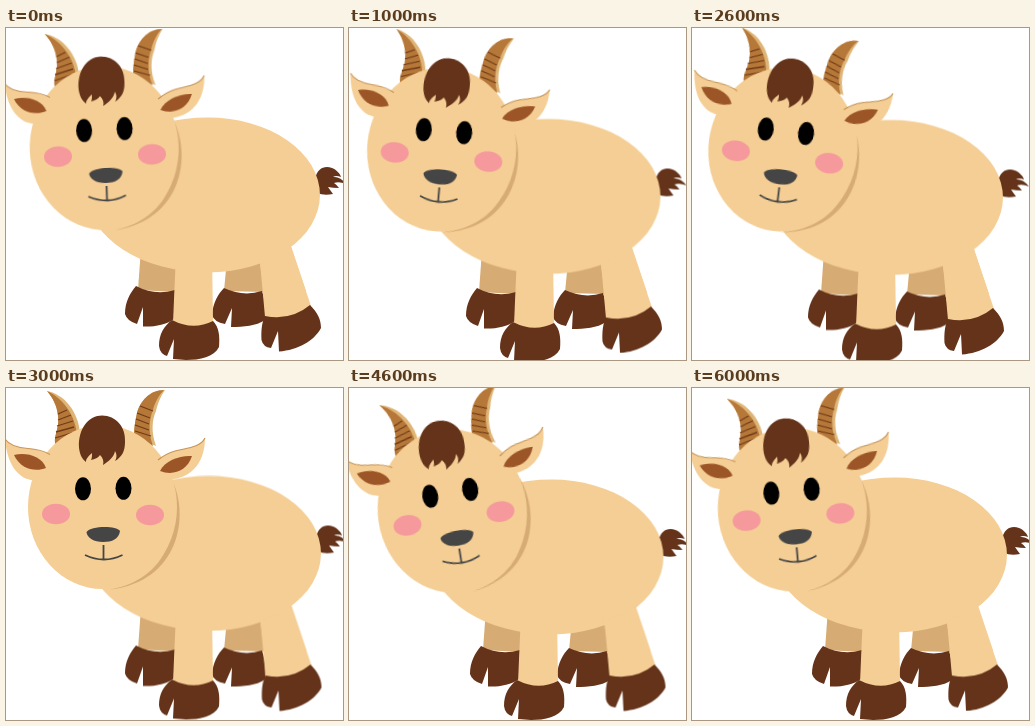
Animation of 337 by 332 pixels, one loop 7 s. Source, as an HTML page:

```html
<!DOCTYPE html>
<html lang="en">
<head>
<meta charset="utf-8">
<title>Goat</title>
<style>
  html, body { margin: 0; width: 100%; height: 100%; overflow: hidden; background: #fff; }
  svg { display: block; width: 100vw; height: 100vh; }

  .skin { fill: #f4ce94; }
  .shade { fill: #d6ac74; }
  .hoof { fill: #64331a; }
  .inner { fill: #9c5527; }
  .horn { fill: #b67839; }
  .rim { fill: #dfb577; }
  .edge { fill: none; stroke: #c79558; stroke-width: 1.2; }
  .rings { fill: none; stroke: #6f3b17; stroke-width: 1.3; }
  .cheek { fill: #f5999c; }
  .nose { fill: #454545; }
  .mouth { fill: none; stroke: #454545; stroke-width: 1.8; }

  /* every pose is held for one second */
  .body, .front, .rear, .head { animation: 7s step-end infinite; }
  .body { animation-name: body; }
  .front { animation-name: front; }
  .rear { animation-name: rear; }
  .head { animation-name: head; transform-origin: 97px 126.5px; }

  @keyframes body {
    0% { transform: translate(0, 0); }
    14.2857% { transform: translate(-2.5px, 1.5px); }
    28.5714% { transform: translate(-3px, 2.5px); }
    42.8571% { transform: translate(1px, -1.5px); }
    57.1428% { transform: translate(.5px, 2px); }
    71.4285% { transform: translate(1px, 3.5px); }
    85.7142% { transform: translate(1px, 0); }
  }
  @keyframes front {
    0% { transform: translate(0, 0); }
    14.2857% { transform: translate(-2px, 2px); }
    28.5714% { transform: translate(-3px, 3.5px); }
    42.8571% { transform: translate(0, -.5px); }
    57.1428% { transform: translate(2px, 0); }
    71.4285% { transform: translate(3.5px, .5px); }
    85.7142% { transform: translate(1px, 0); }
  }
  @keyframes rear {
    0% { transform: translate(0, 0); }
    14.2857% { transform: translate(-2px, 1.5px); }
    28.5714% { transform: translate(-3px, 3px); }
    42.8571% { transform: translate(.5px, -.5px); }
    57.1428% { transform: translate(1.5px, -.5px); }
    71.4285% { transform: translate(1.5px, 0); }
    85.7142% { transform: translate(1px, -.5px); }
  }
  @keyframes head {
    0% { transform: translate(2px, 1px) rotate(-2deg); }
    14.2857% { transform: translate(-4.5px, 2.5px) rotate(5deg); }
    28.5714% { transform: translate(-6.5px, 2.5px) rotate(7deg); }
    42.8571% { transform: translate(0, 0) rotate(0deg); }
    57.1428% { transform: translate(8px, 4px) rotate(-9deg); }
    71.4285% { transform: translate(11.5px, 5.5px) rotate(-12deg); }
    85.7142% { transform: translate(4.5px, 2.5px) rotate(-5deg); }
  }
</style>
</head>
<body>
<svg viewBox="0 0 337 332" preserveAspectRatio="none">
  <!-- far legs -->
  <g class="front">
    <path class="shade" d="M135 220L132 262L169 264L172 220Z"/>
    <path class="hoof" d="M130 258Q149 268 169 262L168 291C160 297 148 299 137 298.500L137 279L131 296Q121 293 119 286C119 274 124 265 130 258Z"/>
    <path class="shade" d="M222 220L218 263L259 264L262 220Z"/>
    <path class="hoof" d="M218 260Q237 269 256 263C259 272 261 284 259 292C250 298 238 299 225 299L226 280L219 296Q208 294 206 287C207 275 212 266 218 260Z"/>
  </g>

  <!-- tail and trunk -->
  <g class="body">
    <path class="hoof" d="M309 151C311 140 319 137 326 140C331 142 334 146 335 149Q330 147 327 149Q334 148 340 156Q333 153 328 155Q331 157 333 160Q327 160 322 159Q324 162 327 166Q318 168 311 165Z"/>
    <path class="skin" d="M202 89.5A112 77.5 0 0 1 202 244.5A120 77.5 0 0 1 202 89.5Z"/>
  </g>

  <!-- near legs -->
  <g class="rear">
    <path class="skin" d="M251 215L258 263Q284 270 300 263L284 215Z"/>
    <path class="hoof" d="M0 0"/>
    <path class="skin" d="M254 234L259 289Q285 293 305 278L285 219Z"/>
    <path class="hoof" d="M259 288Q285 293 304 277C311 284 315 291 315 300C308 313 292 322 273 323.500L272 303L265 320Q257 319 255.500 312C255 302 256 294 259 288Z"/>
  </g>
  <g class="front">
    <path class="skin" d="M170 225L167 295Q187 302 207 295L206 225Z"/>
    <path class="hoof" d="M166 292Q187 303 207 293C213 299 214 308 213 319C208 329 194 332 180 332L167 331L168 311L161 328Q154 326 153 318C153 306 158 298 166 292Z"/>
  </g>

  <g class="head">
    <!-- horns -->
    <path class="rim" d="M41 3C58 6 73 24 74 46L50 58C46 50 54 40 52 28C51 18 47 10 41 3Z"/>
    <path class="horn" d="M41 3C55 9 70 26 71 48L50 58C46 50 54 40 52 28C51 18 47 10 41 3Z"/>
    <path class="rings" d="M52 26L61 22M52 32L65 27M51 38L67 33M50 44L68 39M49 50L69 44"/>
    <path class="rim" d="M159 2C143 2 134 14 131 25C129 34 128 40 128 48L150 58C145 44 146 32 150 23C152 14 155 8 159 2Z"/>
    <path class="horn" d="M158 2C143 2 134 14 131 25C129 34 128 40 128 48L147 58C142 44 143 32 147 22C149 14 153 7 158 2Z"/>
    <path class="rings" d="M134 18L147 23M131 25L144 30M130 31L143 36M129 37L143 42M129 43L145 48"/>

    <!-- face -->
    <path class="shade" d="M166 92C184 128 173 194 104 201.500C170 190 176 126 160 92Z"/>
    <ellipse class="skin" cx="96.500" cy="119" rx="74.500" ry="82"/>

    <!-- ears -->
    <path class="skin" d="M-1 51C4 58 12 60 22 60.500C32 61 40 64 50 70L36 92C20 95 2 86 -1 51Z"/>
    <path class="edge" d="M-1 51C4 58 12 60 22 60.500C31 61 38 63 44 66.500"/>
    <path class="inner" d="M8 67C20 64 36 68 40 80C30 84 15 82 8 67Z"/>
    <path class="skin" d="M199 50C194 60 180 60 169 63C160 66 153 71 146 77L156 90C176 95 199 82 199 50Z"/>
    <path class="edge" d="M199 50C194 60 180 60 169 63C162 65 157 68 152 72"/>
    <path class="inner" d="M186 68C175 67 159 72 154 83C167 88 181 83 186 68Z"/>

    <path class="hoof" d="M73 60C72 40 83 27.500 96 27.500C110 27.500 120 39 119 54C119 63 116 69 109 73C111 70 111 66 109 63C108 69 103 73 97 77C98 73 97 70 94 67C92 70 89 71 85 72C86 70 86 68 86 65C83 68 80 70 80 74C76 71 74 67 73 60Z"/>

    <ellipse cx="77" cy="100.800" rx="8" ry="11.500"/>
    <ellipse cx="117.500" cy="100.300" rx="8" ry="11.500"/>
    <ellipse class="cheek" cx="50" cy="126" rx="14" ry="10.200"/>
    <ellipse class="cheek" cx="144" cy="127" rx="14" ry="10.200"/>
    <path class="nose" d="M80.500 144C84 138 110 137 114 143C113 151 106 154 97 154C88 154 81 150 80.500 144Z"/>
    <path class="mouth" d="M97.500 157V171M79 167Q98 176 116.500 167"/>
  </g>
</svg>
</body>
</html>
```
